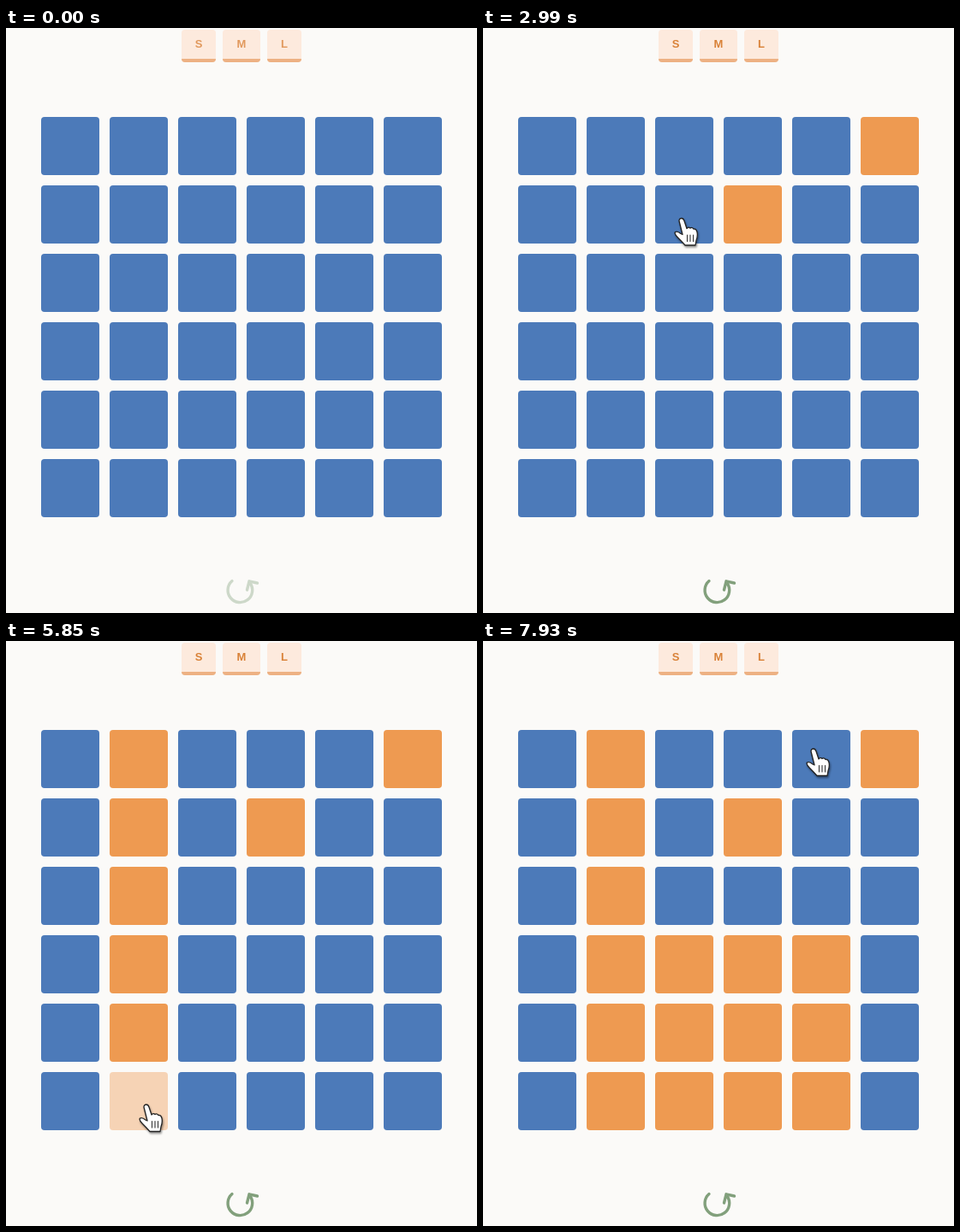
Recreate the animation shown at these times as an HTML page. Size 550x684 px, loop 8000 ms.

```html
<!DOCTYPE html>
<html lang="en">
<head>
<meta charset="utf-8">
<title>Flip grid</title>
<style>
  html, body { margin: 0; width: 100%; height: 100%; overflow: hidden; background: #fbfaf8; }
  .cell { position: absolute; width: 68px; height: 68px; border-radius: 4px; transform-origin: 50% 0; }
  .size {
    position: absolute; top: 2px; height: 38px; box-sizing: border-box;
    border-bottom: 4px solid #edb183; border-radius: 4px; background: #fdeadd;
    font: bold 13px/34px "Liberation Sans", Arial, sans-serif; text-align: center;
  }
  svg { position: absolute; left: 0; top: 0; fill: none; stroke-linecap: round; stroke-linejoin: round; }
  #hand { filter: drop-shadow(1px 2px 1px rgba(0, 0, 0, .4)); }
</style>
</head>
<body>
<div class="size" style="left:205px;width:40px">S</div>
<div class="size" style="left:253px;width:44px">M</div>
<div class="size" style="left:305px;width:40px">L</div>
<div id="grid"></div>
<svg width="550" height="684" viewBox="0 0 550 684">
  <path id="reset" stroke-width="3.4" d="M264 646.5A14.3 14.3 0 1 0 285 649M281.5 657L284 646.8L293.5 649"/>
  <g id="hand">
    <path fill="#fff" stroke="#222" stroke-width="1.3" d="M-2 2Q-2-1 1-1Q3-1 4 2L7 11Q9 8.5 11 10.5Q13 9 15 11.5Q18 11 19 15Q20 20 18 25L17 30.5H5Q1 26-4 21Q-8 17-6.5 15Q-4 13.500 0 17L2 18Z"/>
    <path stroke="#333" stroke-width="1.1" d="M7.500 18.500V26M11 18.500V26M14.500 18.500V26"/>
  </g>
</svg>
<script>
const LOOP = 8000, STEP = 130, N = 6, FLIP = 600;
const BLUE = '#4c7ab9', ORANGE = '#ee9a51';
const PRESS = 5850, RELEASE = 6910;

// Pointer stops: time, x, y
const stops = [
  [260, 282, 655], [650, 474, 140], [1430, 474, 140], [2080, 315, 214], [2860, 315, 214],
  [3120, 147, 233], [3900, 147, 233], [4680, 163, 543], [5850, 163, 543], [6500, 385, 370],
  [7670, 385, 370], [7930, 385, 127]
];

const clamp = v => Math.max(0, Math.min(1, v));
const ease = v => (1 - Math.cos(Math.PI * clamp(v))) / 2;
const hand = document.getElementById('hand');
const reset = document.getElementById('reset');
const sizes = document.querySelectorAll('.size');

function flipStart(row, col) {
  if (row === 0 && col === 5) return 1200;
  if (row === 1 && col === 3) return 2400;
  if (col === 1) return row === 1 ? 3236 : 3491;
  if (row >= 3 && col >= 2 && col <= 4) return 7000;
  return Infinity;
}

const cells = Array.from({ length: N * N }, (_, i) => {
  const row = Math.floor(i / N), col = i % N;
  const el = document.createElement('div');
  el.className = 'cell';
  el.style.left = 41 + col * 80 + 'px';
  el.style.top = 104 + row * 80 + 'px';
  document.getElementById('grid').append(el);
  return { el, row, col, start: flipStart(row, col) };
});

function pointerAt(t) {
  const next = stops.findIndex(s => s[0] >= t);
  if (next < 1) return stops[next < 0 ? stops.length - 1 : 0].slice(1);
  const [t0, x0, y0] = stops[next - 1], [t1, x1, y1] = stops[next];
  const k = ease((t - t0) / (t1 - t0));
  return [x0 + (x1 - x0) * k, y0 + (y1 - y0) * k];
}

function draw(t) {
  const [x, y] = pointerAt(t);
  const dragCol = t > 6500 ? 4 : Math.floor((x - 35) / 80);
  const dragRow = t > 6500 ? 3 : Math.floor((y - 98) / 80);
  const dim = t < PRESS ? 1 : .4 + .6 * clamp((t - RELEASE) / FLIP);

  for (const { el, row, col, start } of cells) {
    const angle = 180 * ease((t - start) / FLIP);
    const selected = col >= 1 && col <= dragCol && row >= dragRow;
    el.style.background = angle < 90 ? BLUE : ORANGE;
    el.style.transform = angle > 0 && angle < 180 ? `perspective(600px) rotateY(${angle}deg)` : 'none';
    el.style.opacity = selected ? dim : 1;
  }

  hand.setAttribute('transform', `translate(${x} ${y})`);
  hand.style.display = t >= 260 && t < 6890 || t >= 7800 ? '' : 'none';

  const wake = clamp((t - 130) / 520);
  reset.setAttribute('stroke', `rgba(130, 160, 124, ${.38 + .62 * wake})`);
  for (const s of sizes) s.style.color = `rgba(217, 130, 56, ${.78 + .22 * wake})`;
}

function tick() {
  const t = performance.now() % LOOP;
  draw(Math.floor(t / STEP) * STEP);
  requestAnimationFrame(tick);
}
tick();
</script>
</body>
</html>
```
